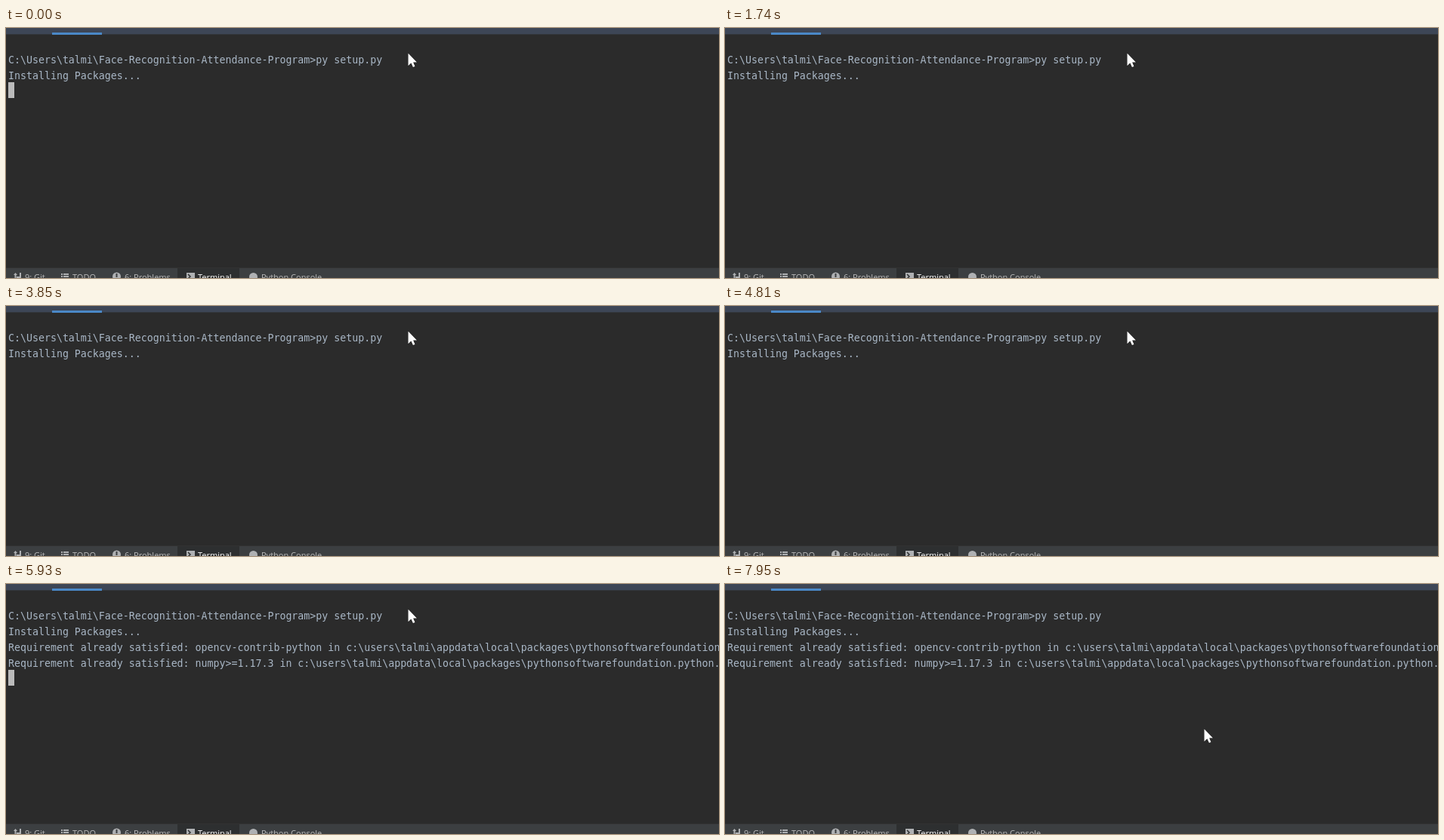
An HTML page for the animation above (8050 ms loop, 944 by 332 pixels).

```html
<!DOCTYPE html>
<html lang="en">
<head>
<meta charset="utf-8">
<title>Package setup in a terminal</title>
<style>
  html, body { margin: 0; width: 100%; height: 100%; overflow: hidden; background: #2b2b2b; }
  svg { display: block; }
  .term { font: 13.288px "DejaVu Sans Mono", "Noto Sans Mono", monospace; fill: #a9b7c6; }
  .tabs { font: 11px "Open Sans", "Noto Sans", sans-serif; fill: #bbb; }
  .tabs .active { font-weight: 500; fill: #fff; }
</style>
</head>
<body>
<svg width="944" height="332" viewBox="0 0 944 332">
  <rect width="944" height="332" fill="#2b2b2b"/>
  <rect width="944" height="8" fill="#3d4656"/>
  <rect y="8" width="944" height="1" fill="#323539"/>
  <rect x="61" y="6" width="66" height="3" fill="#4a88c7"/>

  <g class="term">
    <text x="3" y="47">C:\Users\talmi\Face-Recognition-Attendance-Program&gt;py setup.py</text>
    <text x="3" y="68">Installing Packages...</text>
    <g id="result">
      <text x="3" y="89">Requirement already satisfied: opencv-contrib-python in c:\users\talmi\appdata\local\packages\pythonsoftwarefoundation.python</text>
      <text x="3" y="110">Requirement already satisfied: numpy&gt;=1.17.3 in c:\users\talmi\appdata\local\packages\pythonsoftwarefoundation.python.</text>
    </g>
  </g>
  <rect id="caret" x="3" y="72" width="8" height="21" fill="#bbb"/>

  <!-- tool window bar -->
  <rect y="318" width="944" height="1" fill="#323232"/>
  <rect y="319" width="944" height="13" fill="#3c3f41"/>
  <rect x="227" y="319" width="82" height="13" fill="#2d2f30"/>
  <g class="tabs">
    <text x="25" y="334.5">9: Git</text>
    <text x="88" y="334.5">TODO</text>
    <text x="157" y="334.5">6: Problems</text>
    <text x="254" y="334.5" class="active">Terminal</text>
    <text x="338" y="334.5">Python Console</text>
  </g>
  <g fill="#afb1b3">
    <path d="M10 328l2.5-3 2.5 3h-1.5v4h-2v-4zM14 330h4v-5h2v7h-6z"/>
    <path d="M73 326h2v2h-2zm3 0h7v2h-7zM73 329h2v2h-2zm3 0h7v2h-7z"/>
    <circle cx="146.5" cy="330" r="5.5"/>
    <path d="M145.5 326h2v5h-2z" fill="#3c3f41"/>
    <rect x="239" y="325" width="11" height="10"/>
    <path d="M241 327l3 3-3 3" fill="none" stroke="#2d2f30" stroke-width="1.5"/>
    <circle cx="327.5" cy="330.5" r="5.5"/>
  </g>

  <path id="mouse" d="M.5 .5V17.3L4.4 13.6 6.9 19 9.5 18 7.2 12.5H12Z" fill="#fff" stroke="#111" paint-order="stroke"/>
</svg>
<script>
  const LOOP = 8050, DONE = 5930, MOVED = 7950;
  // times at which the caret turns on or off, starting visible
  const BLINKS = [810, 1210, 1740, 2240, 2800, 3320, 3850, 4290, 4810, 5310, 5810, DONE, 6990, 7520, MOVED];
  const [result, caret, mouse] = ["result", "caret", "mouse"].map(id => document.getElementById(id));
  const show = (el, on) => el.setAttribute("visibility", on ? "visible" : "hidden");

  function draw(t) {
    show(result, t >= DONE);
    show(caret, BLINKS.filter(b => b <= t).length % 2 === 0);
    caret.setAttribute("y", t < DONE ? 72 : 114);
    mouse.setAttribute("transform", t < MOVED ? "translate(532 33)" : "translate(634 192)");
  }

  const start = performance.now();
  function tick() {
    draw((performance.now() - start) % LOOP);
    requestAnimationFrame(tick);
  }
  tick();
</script>
</body>
</html>
```
